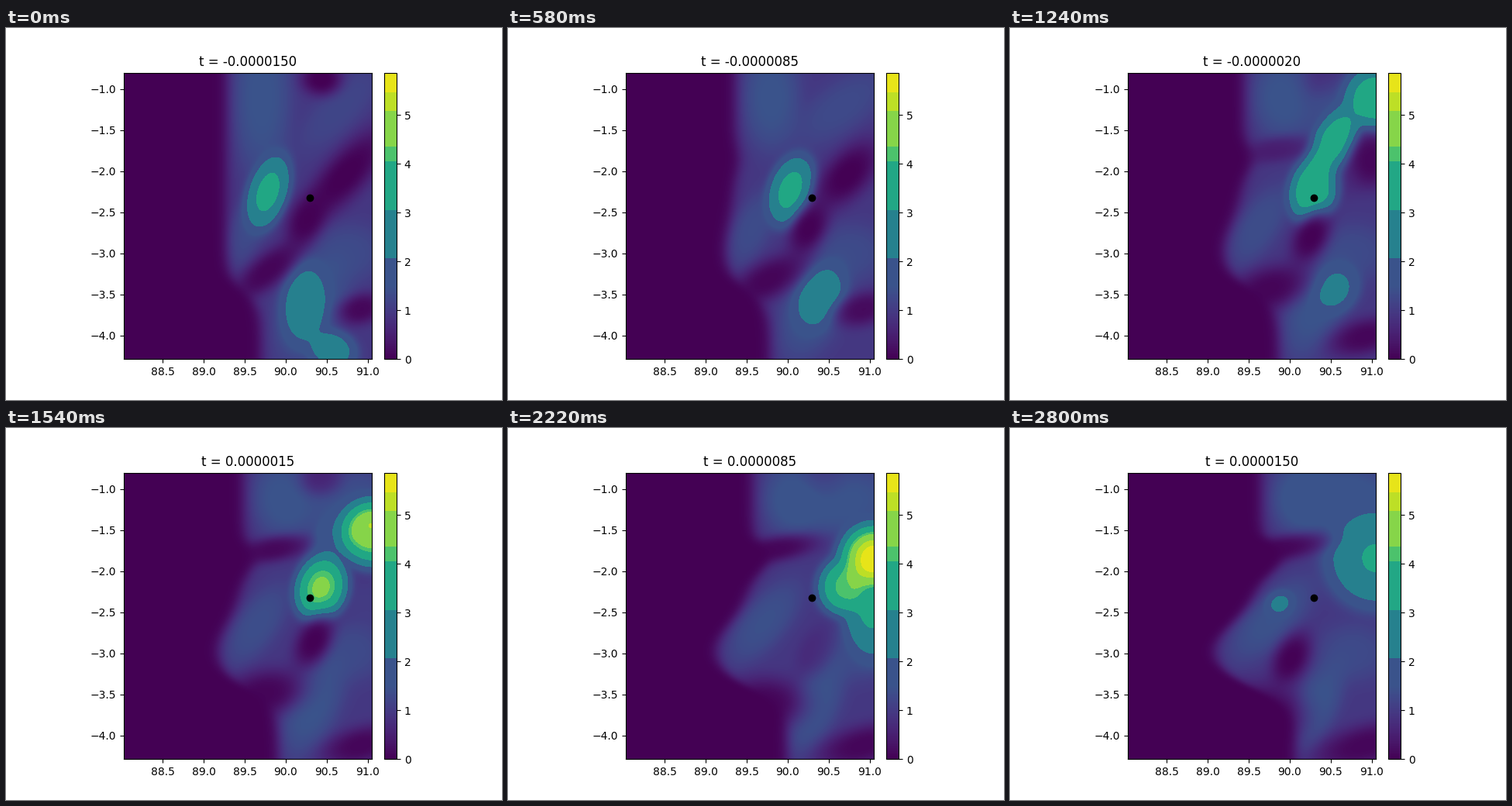
A matplotlib script that plays this animation: 640 px wide and 480 px high, repeating every 2820 ms.

```python
import numpy as np
import matplotlib.pyplot as plt
from matplotlib.animation import FuncAnimation
from matplotlib.colors import ListedColormap

W, H, DPI = 640, 480, 100
LEFT, TOP, WIDE, TALL = 152, 57.6, 320, 369.6   # plot box in pixels
SCALE = 105.96                                  # pixels per data unit
VMAX = 5.87
STEPS = 61
HOLD = (0, 1, 1, 1, 1, 1, 2)                    # 20, 100, 20 ms rhythm in 20 ms ticks

plt.rcParams["font.family"] = "DejaVu Sans"

cols, rows = 160, 185
gx, gy = np.meshgrid(LEFT + WIDE * (np.arange(cols) + 0.5) / cols,
                     TOP + TALL * (np.arange(rows) + 0.5) / rows)


def pulse(v, centre, width):
    return np.exp(-((v - centre) / width) ** 2)


def rise(v, centre, width):
    """Smooth step from 0 to 1."""
    return 0.5 + 0.5 * np.tanh((v - centre) / (2 * width))


def blob(x, y, a, b, tilt=0):
    """Tilted bell with half-height radii a and b, in pixels."""
    c, s = np.cos(np.radians(tilt)), np.sin(np.radians(tilt))
    dx, dy = gx - x, gy - y
    r2 = ((dx * c + dy * s) / a) ** 2 + ((dy * c - dx * s) / b) ** 2
    return np.exp(-np.log(2) * r2 ** 1.5)


def hills(s):
    """Bright structures at loop phase s; most drift to the right."""
    # background flow
    yield 0.95
    yield 1.45 * blob(330 + 45 * s, 90, 46, 58 + 70 * (1 - s) ** 4)
    yield (1.1 + 0.45 * s) * blob(430, 105 - 10 * s, 92, 35 + 25 * s, 134 + 46 * s)
    yield (1.2 + 0.2 * s) * blob(308 + 30 * s, 262 - 15 * s,
                                 65 + 20 * s, 30 + 8 * s, 113 + 22 * s)
    yield 1.45 * blob(395, 360, 90 - 10 * s, 52 - 18 * s, 115)
    yield 1.2 * blob(443, 290, 60, 48)
    # main filament and its tail
    core = (3.3 + 1.4 * pulse(s, 0.64, 0.22)) * (1 - 0.7 * rise(s, 0.89, 0.02))
    yield core * blob(338 + 125 * s, 212 - 10 * s, 52 - 18 * s, 27 + 10 * s, 108)
    yield 2.45 * pulse(s, 0.32, 0.1) * blob(347, 230, 38, 17, 100)
    # burst on the right edge, tied to the filament
    size = 42 + 24 * rise(s, 0.9, 0.03)
    burst = 6 * pulse(s, 0.69, 0.38) * rise(s, 0.36, 0.02)
    yield burst * blob(472, 90 + 78 * rise(s, 0.54, 0.03), size, size)
    yield 3.7 * pulse(s, 0.45, 0.12) * blob(417, 150, 58, 28, 119)
    yield 4.1 * pulse(s, 0.72, 0.13) * blob(470, 225, 40, 75)
    yield 2.5 * pulse(s, 0.65, 0.08) * blob(460, 95, 58, 60)
    # lower filament
    yield 2.65 * (1 - rise(s, 0.5, 0.04)) * blob(386 + 75 * s, 357 - 45 * s,
                                                 58 - 45 * s, 33, 95 + 90 * s)
    yield 2.5 * pulse(s, 0, 0.1) * blob(420, 415, 36, 28, 20)
    yield 2.5 * pulse(s, 0.32, 0.08) * blob(466, 292, 40, 30, 140)
    # short-lived spots
    yield 2.4 * pulse(s, 0.33, 0.08) * blob(290 + 120 * s, 57, 20, 18)
    yield 2.2 * rise(s, 0.93, 0.015) * blob(348, 227, 21, 18, 150)


def holes(s):
    """Dark gaps, as the share of the height they remove."""
    yield (pulse(s, 0, 0.07) + 0.5 * pulse(s, 0.6, 0.15)) * blob(407, 66, 24, 20)
    yield (1 - rise(s, 0.4, 0.03)) * blob(438, 190, 68 - 100 * min(s, 0.4), 25, 132)
    yield pulse(s, 0.4, 0.1) * blob(467, 170, 33, 25, 90)
    shift = 25 * pulse(s, 0.67, 0.12) - 26 * rise(s, 0.9, 0.03)
    yield (0.97 - 0.65 * pulse(s, 0.78, 0.06)) * blob(388 + shift, 248 + 50 * s,
                                                      33, 20, 118)
    yield 0.92 * blob(338 - 10 * s, 313 + 55 * s, 48, 19 + 15 * s, 140 + 50 * s)
    yield 0.9 * rise(s, 0.42, 0.04) * blob(345, 157, 25 + 33 * s, 15, 170)
    yield 0.9 * (1 - pulse(s, 0.12, 0.06)) * blob(458, 363 + 47 * rise(s, 0.4, 0.03),
                                                  28 + 32 * s, 18 + 6 * s, 165)


def field(s):
    total = sum(h ** 4 for h in hills(s)) ** 0.25
    for gap in holes(s):
        total = total * (1 - gap)
    # everything left of a wavy front stays near zero
    front = (285 + 45 * rise(gy, 340, 12)
             + s * (40 + 25 * pulse(gy, 170, 25) - 60 * pulse(gy, 290, 55)))
    return total * rise(gx, front, 5)


def banded_map(n=1024):
    """Viridis, smooth at the low end and in flat bands above."""
    v = np.linspace(0, VMAX, n)
    edges = [2.07, 3.05, 4.05, 4.36, 5.08, 5.47]
    tones = np.array([1.5, 2.56, 3.5, 4.2, 4.8, 5.28, 5.65])
    shade = np.where(v < 1.5, v, tones[np.digitize(v, edges)])
    return ListedColormap(plt.cm.viridis(shade / VMAX))


def box(x, w):
    return [x / W, 1 - (TOP + TALL) / H, w / W, TALL / H]


fig = plt.figure(figsize=(W / DPI, H / DPI), dpi=DPI, facecolor="white")
ax = fig.add_axes(box(LEFT, WIDE))
cax = fig.add_axes(box(488, 16))

fields = [field(i / (STEPS - 1)) for i in range(STEPS)]
x0, y1 = 88.028, -0.8
x1, y0 = x0 + WIDE / SCALE, y1 - TALL / SCALE
image = ax.imshow(fields[0], cmap=banded_map(), vmin=0, vmax=VMAX,
                  extent=(x0, x1, y0, y1), aspect="auto",
                  interpolation="bilinear", interpolation_stage="data")
ax.plot(90.296, -2.323, "ko")
ax.set(xlim=(x0, x1), ylim=(y0, y1),
       xticks=np.arange(88.5, 91.1, 0.5), yticks=np.arange(-4.0, -0.9, 0.5))
title = ax.set_title("")
fig.colorbar(image, cax=cax, ticks=range(6))


def update(tick):
    step = 3 * (tick // 7) + HOLD[tick % 7]
    image.set_data(fields[step])
    title.set_text(f"t = {(step - 30) * 5e-7:.7f}")
    return image, title


anim = FuncAnimation(fig, update, frames=141, interval=20,
                     repeat=True, repeat_delay=0, blit=False)
plt.show()
```
